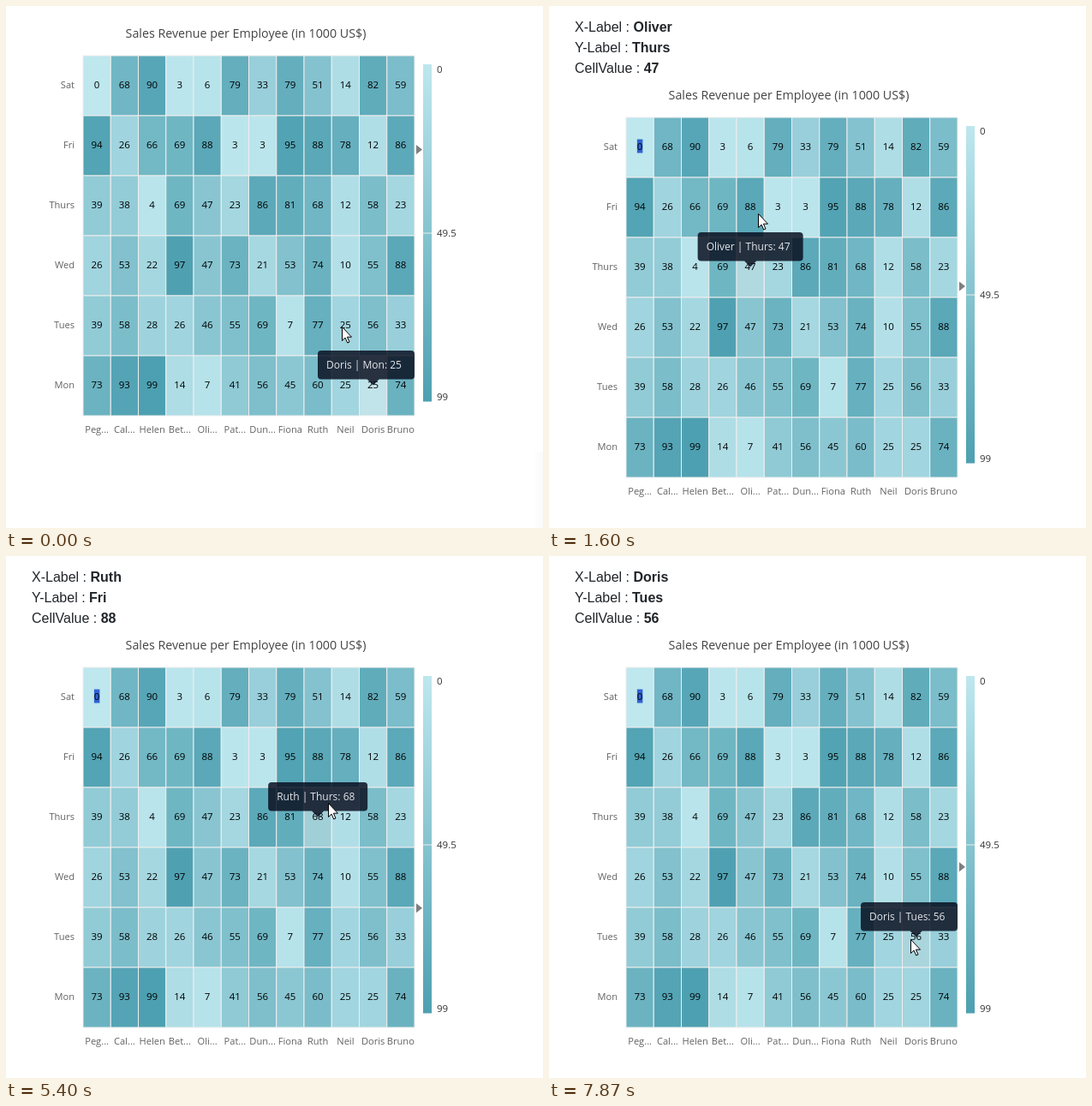
An HTML page for the animation above (8000 ms loop, 627 by 609 pixels).

```html
<!DOCTYPE html>
<html lang="en">
<head>
<meta charset="utf-8">
<title>Sales heat map</title>
<style>
  html, body { margin: 0; width: 100%; height: 100%; overflow: hidden; background: #fff; }
  svg { display: block; width: 627px; height: 609px; font: 11.5px "Open Sans", "Noto Sans", sans-serif; }
  .head { font: 16px "Liberation Sans", Arial, sans-serif; fill: #212529; }
  .head .val { font-weight: bold; }
  .axis { font-size: 11.1px; fill: #626262; }
  .legend { fill: #333; }
  .title { font-size: 14.25px; fill: #434343; }
  .tip { font-size: 12px; fill: #e3e5e9; }
  .mid { text-anchor: middle; }
  .end { text-anchor: end; }
</style>
</head>
<body>
<svg id="stage" viewBox="0 0 627 609">
  <defs>
    <linearGradient id="scale" x2="0" y2="1">
      <stop stop-color="#bee7ee"/>
      <stop offset="1" stop-color="#4da0b1"/>
    </linearGradient>
    <linearGradient id="edge">
      <stop stop-color="#fff"/>
      <stop offset="1" stop-color="#fafafa"/>
    </linearGradient>
  </defs>
</svg>
<script>
const LOOP = 8000, FPS = 15;
const LEFT = 90, TOP = 58, CW = 32.25, CH = 70, SHIFT = 72;
const BAR_TOP = 68, BAR_H = 394;

const days = ["Sat", "Fri", "Thurs", "Wed", "Tues", "Mon"];
const names = ["Peggy", "Calvin", "Helen", "Betsy", "Oliver", "Patrick",
               "Duncan", "Fiona", "Ruth", "Neil", "Doris", "Bruno"];
const values = [
  "0 68 90 3 6 79 33 79 51 14 82 59",
  "94 26 66 69 88 3 3 95 88 78 12 86",
  "39 38 4 69 47 23 86 81 68 12 58 23",
  "26 53 22 97 47 73 21 53 74 10 55 88",
  "39 58 28 26 46 55 69 7 77 25 56 33",
  "73 93 99 14 7 41 56 45 60 25 25 74"
].map(row => row.split(" ").map(Number));

// Pointer moves in ticks
const home = [428, 440];
const moves = [
  { from: -1, to: 0, x: 392, y: 374 },
  { from: 0, to: 12, x: 251, y: 245 },
  { from: 12, to: 16, x: 244, y: 242 },
  { from: 38.4, to: 46, x: 360, y: 261 },
  { from: 77, to: 86, x: 396, y: 322 },
  { from: 100, to: 112, x: 422, y: 447 }
];
// A click selects a number: its own, or the first one in the chart
const clicks = [{ at: 22 }, { at: 58 }, { at: 90, own: true }, { at: 118 }];
const SHIFT_TICK = clicks[0].at, REHOVER_TICK = 39;

const stage = document.getElementById("stage");

function set(el, attrs) {
  for (const key in attrs) el.setAttribute(key, attrs[key]);
}
function add(parent, tag, attrs, text) {
  const el = document.createElementNS("http://www.w3.org/2000/svg", tag);
  set(el, attrs);
  if (text !== undefined) el.textContent = text;
  parent.appendChild(el);
  return el;
}
function label(parent, cls, x, y, text) {
  return add(parent, "text", { class: cls, x, y }, text);
}
function show(el, on) {
  el.style.display = on ? "" : "none";
}
const short = name => name.length > 5 || name.endsWith("y") ? name.slice(0, 3) + "..." : name;
const midX = col => LEFT + CW * (col + 0.5);
const midY = row => TOP + CH * (row + 0.5);

function shade(v) {
  const a = [190, 231, 238], b = [77, 160, 177];
  return `rgb(${a.map((c, i) => Math.round(c + (b[i] - c) * v / 99))})`;
}

// Header
const edge = add(stage, "rect", { x: 615, y: 520, width: 12, height: 89, fill: "url(#edge)" });
const head = add(stage, "g", { class: "head" });
const fields = ["X-Label : ", "Y-Label : ", "CellValue : "].map((text, i) => {
  const line = label(head, "", 30, 30 + i * 24);
  line.style.whiteSpace = "pre";
  add(line, "tspan", {}, text);
  return add(line, "tspan", { class: "val" });
});

// Chart
const chart = add(stage, "g", {});
label(chart, "title mid", 280, 37, "Sales Revenue per Employee (in 1000 US$)");
const cells = values.map((row, r) => row.map((v, c) => add(chart, "rect", {
  x: LEFT + c * CW, y: TOP + r * CH, width: CW, height: CH,
  fill: shade(v), stroke: "#eee"
})));
const mark = add(chart, "rect", { height: 16, fill: "#2f62d3" });
values.forEach((row, r) => row.forEach((v, c) =>
  label(chart, "mid", midX(c), midY(r) + 3, v)));
days.forEach((day, r) => label(chart, "axis end", 80, midY(r) + 3, day));
names.forEach((name, c) => label(chart, "axis mid", midX(c), 498, short(name)));

// Legend
add(chart, "rect", { x: 487, y: BAR_TOP, width: 10, height: BAR_H - 0.5, fill: "url(#scale)" });
add(chart, "rect", { x: 487, y: 264.5, width: 10, height: 1, fill: "#eee" });
["0", "49.5", "99"].forEach((text, i) => label(chart, "legend", 503, 78 + i * 191, text));
const pin = add(chart, "path", { d: "M479-5.5L486 0L479 5.5Z", fill: "#7f7f7f" });

// Tooltip and pointer
const bubble = add(chart, "path", { fill: "#060a1c", "fill-opacity": 0.82 });
const tip = label(chart, "tip", 0, 0, "");
const pointer = add(stage, "path", {
  d: "M.5.5V16.5L4.1 13.1L6.7 19L9 18L6.4 12.2H11.5Z",
  fill: "#fff", stroke: "#000", "stroke-linejoin": "round"
});

function pointerAt(k) {
  let [x, y] = home;
  for (const m of moves) {
    const p = Math.min(1, Math.max(0, (k - m.from) / (m.to - m.from)));
    x += (m.x - x) * p;
    y += (m.y - y) * p;
  }
  return [x, y];
}

// The hovered cell follows the pointer one tick late
function hoverAt(k) {
  const [x, y] = pointerAt(k - 1);
  const top = TOP + (k > REHOVER_TICK ? SHIFT : 0);
  return [Math.floor((y - top) / CH), Math.floor((x - LEFT) / CW)];
}

let lit;
function showHover([r, c]) {
  const v = values[r][c];
  if (lit) lit.setAttribute("opacity", 1);
  lit = cells[r][c];
  lit.setAttribute("opacity", 0.65);
  pin.setAttribute("transform", `translate(0 ${BAR_TOP + BAR_H * v / 99})`);

  tip.textContent = `${names[c]} | ${days[r]}: ${v}`;
  const w = Math.round(tip.getComputedTextLength() + 25), h = 33.5;
  const cx = midX(c), y = midY(r) - 41;
  const x = Math.min(cx - w / 2, 477 - w);
  set(tip, { x: x + 10, y: y + 20.5 });
  bubble.setAttribute("d",
    `M${x + 4} ${y}h${w - 8}q4 0 4 4v${h - 8}q0 4 -4 4H${cx + 7}l-7 7l-7 -7H${x + 4}` +
    `q-4 0 -4 -4v${8 - h}q0 -4 4 -4Z`);
}

function showHeader(k) {
  const click = clicks.filter(c => c.at <= k).pop();
  show(head, click);
  if (!click) return;
  const [r, c] = hoverAt(click.at);
  [names[c], days[r], values[r][c]].forEach((text, i) => fields[i].textContent = text);
}

// Pressing clears the selection, releasing sets the next one
function showMark(k) {
  const click = clicks.filter(c => c.at - 1 <= k).pop();
  const pressed = clicks.some(c => k >= c.at - 4 && k < c.at - 1);
  const on = click && !pressed;
  show(mark, on);
  if (!on) return;
  const [r, c] = click.own ? hoverAt(click.at) : [0, 0];
  const w = String(values[r][c]).length * 6.5;
  set(mark, { x: midX(c) - w / 2, y: midY(r) - 9.5, width: w });
}

function draw(t) {
  const k = Math.floor((t + 4) * FPS / 1000);
  const shifted = k >= SHIFT_TICK;
  chart.setAttribute("transform", `translate(0 ${shifted ? SHIFT : 0})`);
  pointer.setAttribute("transform", `translate(${pointerAt(k).map(Math.round)})`);
  show(edge, !shifted);
  showHover(hoverAt(k));
  showHeader(k);
  showMark(k);
}

const start = performance.now();
function loop() {
  draw((performance.now() - start) % LOOP);
  requestAnimationFrame(loop);
}
loop();
</script>
</body>
</html>
```
